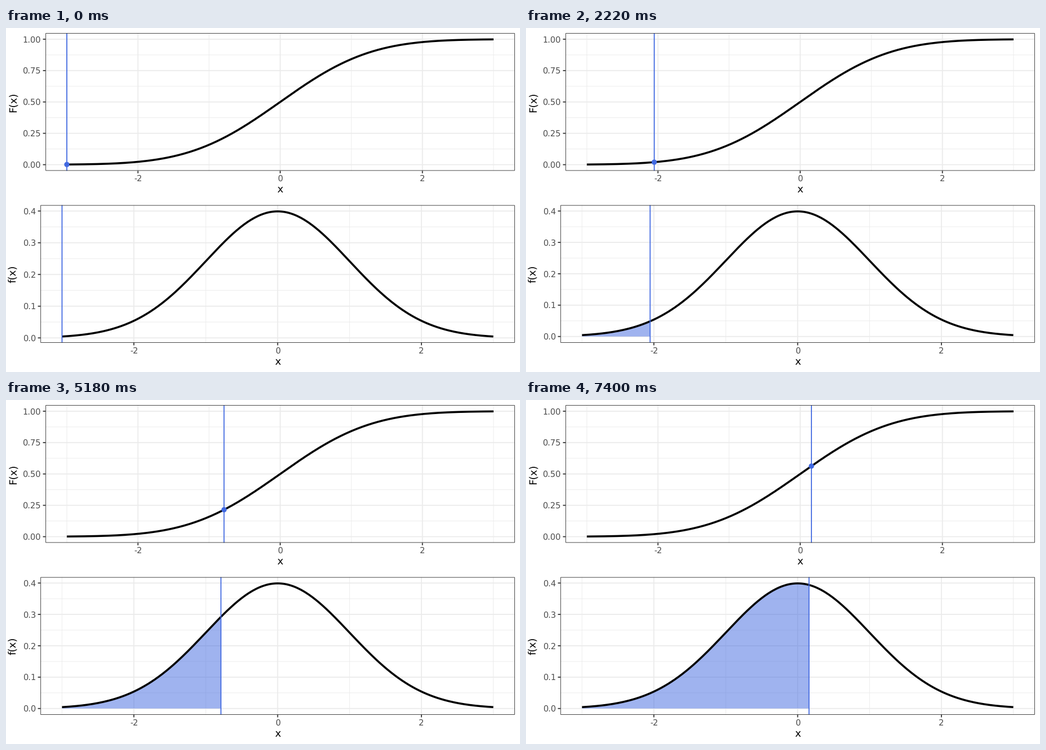
Animation, 913 px wide and 613 px high, one loop 8000 ms. Source, as a matplotlib script:

```python
import math

import numpy as np
import matplotlib.pyplot as plt
from matplotlib.animation import FuncAnimation
from matplotlib.patches import Circle, Rectangle

plt.rcParams.update({
    "font.family": "DejaVu Sans",
    "text.hinting": "none",
    "path.snap": False,
})

W, H, DPI = 913, 613, 128
PX = 72 / DPI          # points per pixel
PT = 1.66              # pixels per typographic point of the chart theme
TICK, GAP = 2.75 * PT, 2.2 * PT
BLUE, GRID, DARK, GREY = "#4169E1", "#EBEBEB", "#333333", "#4D4D4D"

STEP_MS, TICK_MS, LOOP_MS = 740, 40, 8000
XS = np.linspace(-3, 3, 241)


def pdf(x):
    return np.exp(-np.square(x) / 2) / math.sqrt(2 * math.pi)


def cdf(x):
    return 0.5 * (1 + math.erf(x / math.sqrt(2)))


fig = plt.figure(figsize=(W / DPI, H / DPI), dpi=DPI, facecolor="white")
ax = fig.add_axes([0, 0, 1, 1])
ax.set(xlim=(0, W), ylim=(H, 0))
ax.axis("off")


def line(x, y, color, width, z):
    return ax.plot(x, y, color=color, lw=width * PX, zorder=z,
                   solid_capstyle="butt", solid_joinstyle="round")[0]


def label(x, y, s, size, color, **kw):
    return ax.text(x, y, s, fontsize=size * PX, color=color, **kw)


class Panel:
    """A plot panel whose data range is padded by 5% on each side."""

    def __init__(self, left, top, lo, hi):
        self.left, self.top = left, top
        self.right, self.bottom = 903.87, top + 245.27
        self.lo, self.hi = lo, hi

    def x(self, v):
        mid = (self.left + self.right) / 2
        return mid + np.asarray(v) * (self.right - self.left) / 6.6

    def y(self, v):
        mid = (self.top + self.bottom) / 2
        scale = (self.bottom - self.top) / 1.1 / (self.hi - self.lo)
        return mid - (np.asarray(v) - (self.lo + self.hi) / 2) * scale

    def frame(self, title):
        for v in range(-3, 4):
            major = v % 2 == 0
            x = self.x(v)
            line([x, x], [self.top, self.bottom], GRID,
                 1.78 if major else 0.89, 2 if major else 1)
            if major:
                line([x, x], [self.bottom, self.bottom + TICK], DARK, 1.78, 2)
                label(x, self.bottom + TICK + GAP + 10.6, str(v), 14.65, GREY,
                      ha="center", va="baseline")
        ax.add_patch(Rectangle(
            (self.left + 0.45, self.top + 0.45),
            self.right - self.left - 0.9, self.bottom - self.top - 0.9,
            fill=False, ec=DARK, lw=0.9 * PX, zorder=8))
        label(self.x(0), self.bottom + 38.6, "x", 18.3, "black",
              ha="center", va="baseline")
        label(22.3, (self.top + self.bottom) / 2, title, 18.3, "black",
              rotation=90, ha="right", va="center", rotation_mode="default")

    def scale(self, step, count, digits):
        """Horizontal grid, ticks and tick labels."""
        parts = []
        for i in range(2 * count + 1):
            major = i % 2 == 0
            v = i * step / 2
            y = self.y(v)
            parts.append(line([self.left, self.right], [y, y], GRID,
                              1.78 if major else 0.89, 2 if major else 1))
            if major:
                parts.append(line([self.left - TICK, self.left], [y, y],
                                  DARK, 1.78, 2))
                parts.append(label(self.left - TICK - GAP, y + 5.35,
                                   f"{v:.{digits}f}", 14.65, GREY,
                                   ha="right", va="baseline"))
        return parts

    def curve(self, values):
        return line(self.x(XS), self.y(values), "black", 3.556, 4)

    def marker(self):
        return line([0, 0], [self.top, self.bottom], BLUE, 1.78, 5)


upper = Panel(70.2, 9.13, cdf(-3), cdf(3))
upper.frame("F(x)")
upper.scale(0.25, 4, 2)
upper.curve([cdf(v) for v in XS])
upper_line = upper.marker()
dot = ax.add_patch(Circle((0, 0), 4.7, fc=BLUE, ec="none", zorder=6))

# Without the shaded area the lower axis starts at the curve's minimum.
bare = Panel(61.2, 315.63, pdf(3), pdf(0))
lower = Panel(61.2, 315.63, 0, pdf(0))
lower.frame("f(x)")
bare_parts, full_parts = (p.scale(0.1, 4, 1) + [p.curve(pdf(XS))]
                          for p in (bare, lower))
lower_line = lower.marker()
area = ax.fill([0, 0, 0], [0, 0, 0], color=BLUE, alpha=0.5, lw=0, zorder=3)[0]


def draw(i):
    k = int((i + 0.5) * TICK_MS // STEP_MS)
    v = -3 + 6 * k / 19
    upper_line.set_xdata([upper.x(v)] * 2)
    lower_line.set_xdata([lower.x(v)] * 2)
    dot.center = float(upper.x(v)), float(upper.y(cdf(v)))

    for part in bare_parts:
        part.set_visible(k == 0)
    for part in full_parts:
        part.set_visible(k > 0)

    s = np.linspace(-3, v, 120)
    xs = np.concatenate([s, [v, -3]])
    ys = np.concatenate([pdf(s), [0, 0]])
    area.set_xy(np.column_stack([lower.x(xs), lower.y(ys)]))
    area.set_visible(k > 0)
    return []


anim = FuncAnimation(fig, draw, frames=LOOP_MS // TICK_MS, interval=TICK_MS,
                     init_func=lambda: draw(0), repeat=True, repeat_delay=0,
                     cache_frame_data=False)
plt.show()
```
